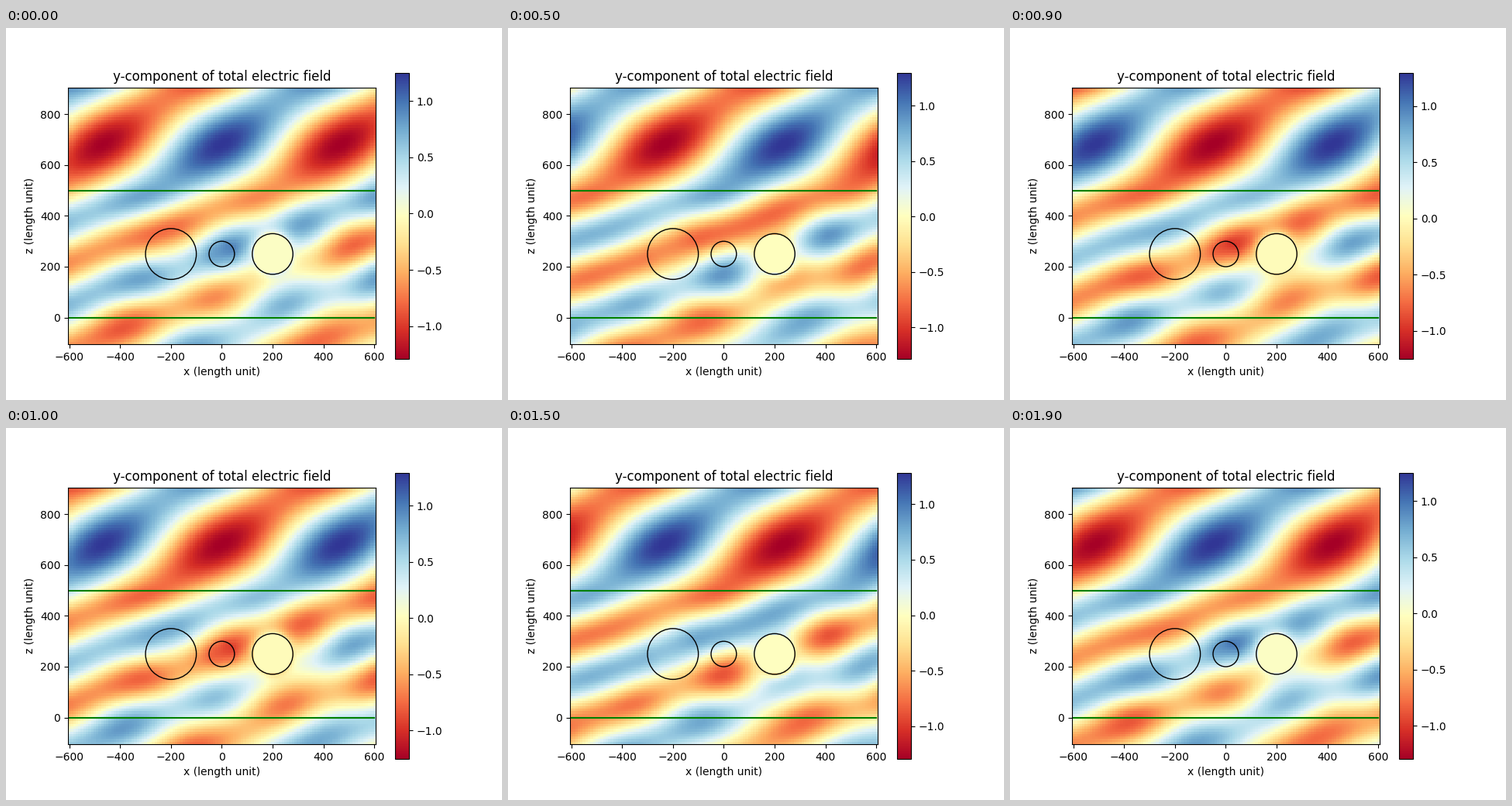
A matplotlib script that plays this animation: 640x480 px, repeating every 2 s.

```python
import numpy as np
import matplotlib.pyplot as plt
from matplotlib.animation import FuncAnimation

FRAMES = 20
ORDER = 6                        # highest multipole order
K0 = 2 * np.pi / 550             # vacuum wavenumber
N_TOP, N_SLAB, N_BOT = 1.0, 1.8, 1.5
DEPTH, MID = 500, 250            # slab thickness, height of the spheres
K = N_SLAB * K0
TILT = np.pi / 5


# --- layered medium without spheres --------------------------------------

KX = K0 * N_TOP * np.sin(TILT)


def kz_of(n, kt):
    return np.sqrt((n * K0) ** 2 - kt ** 2 + 0j)


def fresnel(a, b):
    return (a - b) / (a + b)


Q0, Q1, Q2 = (kz_of(n, KX) for n in (N_TOP, N_SLAB, N_BOT))
R01, R12 = fresnel(Q0, Q1), fresnel(Q1, Q2)
PASS = np.exp(1j * Q1 * DEPTH)
INC = np.exp(-1j * Q0 * DEPTH)
DOWN = INC * (1 + R01) / (1 + R01 * R12 * PASS ** 2)
UP = DOWN * R12 * PASS


def background(x, z):
    h = z - DEPTH
    back = DOWN * (1 + R12 * PASS ** 2) - INC
    top = INC * np.exp(-1j * Q0 * h) + back * np.exp(1j * Q0 * h)
    slab = DOWN * np.exp(-1j * Q1 * h) + UP * np.exp(1j * Q1 * z)
    low = DOWN * PASS * (1 + R12) * np.exp(-1j * Q2 * z)
    return np.exp(1j * KX * x) * np.where(h >= 0, top, np.where(z > 0, slab, low))


# --- Mie scattering ------------------------------------------------------

def psi(z):
    """Riccati-Bessel functions of orders 0..ORDER by power series."""
    out = []
    for n in range(ORDER + 1):
        term = z ** (n + 1) / np.prod(np.arange(1.0, 2 * n + 2, 2))
        total = term
        for k in range(1, 28):
            term = term * (-z * z / 2) / (k * (2 * n + 2 * k + 1))
            total = total + term
        out.append(total)
    return out


def xi(z):
    """Outgoing Riccati-Hankel functions of orders 0..ORDER."""
    e = np.exp(1j * z)
    out = [-1j * e, -e * (1 + 1j / z)]
    for n in range(1, ORDER):
        out.append((2 * n + 1) / z * out[n] - out[n - 1])
    return out


def slope(f, z, n):
    return f[n - 1] - n * f[n] / z


class Ball:
    def __init__(self, x, radius, index):
        self.x, self.radius = x, radius
        self.m = m = index / N_SLAB
        s = K * radius
        p, q, h = psi(s), psi(m * s), xi(s)
        self.outer, self.inner = [], []
        for n in range(1, ORDER + 1):
            dp, dq, dh = slope(p, s, n), slope(q, m * s, n), slope(h, s, n)
            den_a = m * q[n] * dh - h[n] * dq
            den_b = q[n] * dh - m * h[n] * dq
            a = (m * q[n] * dp - p[n] * dq) / den_a
            b = (q[n] * dp - m * p[n] * dq) / den_b
            self.outer.append((1j * a, -b))
            self.inner.append((m / den_a, 1j * m / den_b))
        phase = np.exp(1j * (KX * x + Q1 * MID))
        self.base = [(KX / K, -Q1.real / K, DOWN * PASS / np.exp(2j * Q1 * MID) * phase),
                     (KX / K, Q1.real / K, UP * phase)]
        self.waves = list(self.base)

    def respond(self, ux, uz, x, y, z, inside):
        """Ex, Ey caused by a unit y-polarised plane wave along (ux, 0, uz)."""
        px, py, pz = y, ux * z - uz * x + 1e-3, ux * x + uz * z
        side = np.hypot(px, py)
        r = np.hypot(side, pz)
        mu, s, cp, sp = pz / r, side / r, px / side, py / side
        rho = K * r * (self.m if inside else 1)
        f = psi(rho) if inside else xi(rho)
        coefs = self.inner if inside else self.outer
        er = et = ep = 0
        pi_old, pi_n = 0 * mu, 0 * mu + 1
        for n in range(1, ORDER + 1):
            tau = n * mu * pi_n - (n + 1) * pi_old
            w = 1j ** n * (2 * n + 1) / (n * (n + 1))
            ca, cb = (w * c for c in coefs[n - 1])
            g, dg = f[n] / rho, slope(f, rho, n) / rho
            er = er + ca * n * (n + 1) * s * pi_n * g / rho
            et = et + ca * tau * dg + cb * pi_n * g
            ep = ep + ca * pi_n * dg + cb * tau * g
            pi_old, pi_n = pi_n, ((2 * n + 1) * mu * pi_n - (n + 1) * pi_old) / n
        flat = er * s + et * mu
        ey = flat * cp ** 2 + ep * sp ** 2
        ex = -uz * (flat - ep) * sp * cp + ux * (er * mu - et * s) * cp
        return ex, ey

    def change(self, x, y, z, inside=False):
        """Deviation from the undisturbed field made by this ball."""
        x, z = x - self.x, z - MID
        ex = ey = 0
        for ux, uz, amp in self.waves:
            fx, fy = self.respond(ux, uz, x, y, z, inside)
            if inside:
                fy = fy - np.exp(1j * K * (ux * x + uz * z))
            ex, ey = ex + amp * fx, ey + amp * fy
        return ex, ey


balls = [Ball(-200, 100, 1.45), Ball(0, 50, 1.3), Ball(200, 80, 1 + 6j)]


def couple(rounds=4):
    """Let each ball also see the waves coming from its neighbours."""
    for _ in range(rounds):
        fresh = []
        for b in balls:
            extra = [(float(np.sign(b.x - o.x)), 0.0, o.change(b.x, 0.0, MID)[1])
                     for o in balls if o is not b]
            fresh.append(b.base + extra)
        for b, waves in zip(balls, fresh):
            b.waves = waves


# --- scattered waves at the two interfaces -------------------------------

def interface_field(xs, zs, count=100, step=80):
    """Reflected and transmitted Ey on the plane y = 0."""
    g = (np.arange(count) - count // 2) * float(step)
    gx, gy = np.meshgrid(g, g, indexing="ij")
    half = count * step / 2
    fade = np.clip((half - np.hypot(gx, gy)) / (half / 2), 0, 1)
    window = np.sin(np.pi / 2 * fade) ** 2
    k = 2 * np.pi * np.fft.fftfreq(count, step)
    kx, ky = np.meshgrid(k + 1e-9, k, indexing="ij")
    kt = np.hypot(kx, ky)
    shift = np.exp(-1j * (kx + ky) * g[0]) / count ** 2

    def spectrum(height):
        parts = [b.change(gx, gy, height) for b in balls]
        ex, ey = (np.fft.fft2(sum(p[i] for p in parts) * window) * shift for i in (0, 1))
        return (kx * ey - ky * ex) / kt, (kx * ex + ky * ey) / kt

    upper, lower = spectrum(DEPTH), spectrum(0)
    layers = (N_TOP, N_SLAB + 0.015j, N_BOT)
    q0, q1, q2 = (kz_of(n, kt) for n in layers)
    e = np.exp(1j * q1 * DEPTH)
    to_x = np.exp(1j * np.outer(k, xs))
    out = np.zeros((len(zs), len(xs)), complex)
    for pol, weight in enumerate((kx / kt, ky / kt)):
        y0, y1, y2 = (n ** 2 / q if pol else q for n, q in zip(layers, (q0, q1, q2)))
        rt, rb = fresnel(y1, y0), fresnel(y1, y2)
        loop = 1 - e ** 2 * rt * rb
        u = weight * (upper[pol] + e * rb * lower[pol]) / loop
        d = weight * (lower[pol] + e * rt * upper[pol]) / loop
        for i, z in enumerate(zs):
            if z >= DEPTH:
                s = u * (1 + rt) * np.exp(1j * q0 * (z - DEPTH))
            elif z > 0:
                s = u * rt * np.exp(1j * q1 * (DEPTH - z)) + d * rb * np.exp(1j * q1 * z)
            else:
                s = d * (1 + rb) * np.exp(-1j * q2 * z)
            out[i] += s.sum(axis=1) @ to_x
    return out


def total_field():
    xs, zs = np.arange(-600.0, 601, 10), np.arange(-100.0, 901, 10)
    gx, gz = np.meshgrid(xs, zs)
    couple()
    field = background(gx, gz) + interface_field(xs, zs)
    slab = (gz > 0) & (gz < DEPTH)
    for b in balls:
        within = np.hypot(gx - b.x, gz - MID) < b.radius
        for mask, inside in ((slab & ~within, False), (within, True)):
            x, z = gx[mask], gz[mask]
            field[mask] += b.change(x, 0 * x, z, inside)[1]
    metal = balls[-1]
    field[np.hypot(gx - metal.x, gz - MID) < metal.radius] = 0
    return field


field = total_field()


def snapshot(i):
    return (field * np.exp(-2j * np.pi * i / FRAMES)).real


# --- plot ----------------------------------------------------------------

fig, ax = plt.subplots(figsize=(6.4, 4.8), dpi=100)
image = ax.imshow(snapshot(0), cmap="RdYlBu", origin="lower", interpolation="none",
                  extent=(-605, 605, -105, 905))
fig.colorbar(image)
for level in (0, DEPTH):
    ax.plot([-600, 600], [level, level], "g")
for b in balls:
    ax.add_patch(plt.Circle((b.x, MID), b.radius, fill=False, ec="k"))
ax.set(xlim=(-605, 605), ylim=(-105, 905), xlabel="x (length unit)",
       ylabel="z (length unit)", title="y-component of total electric field")


def update(i):
    data = snapshot(i)
    image.set_data(data)
    image.set_clim(data.min(), data.max())
    return [image]


anim = FuncAnimation(fig, update, frames=FRAMES, interval=100, repeat=True)
plt.show()
```
